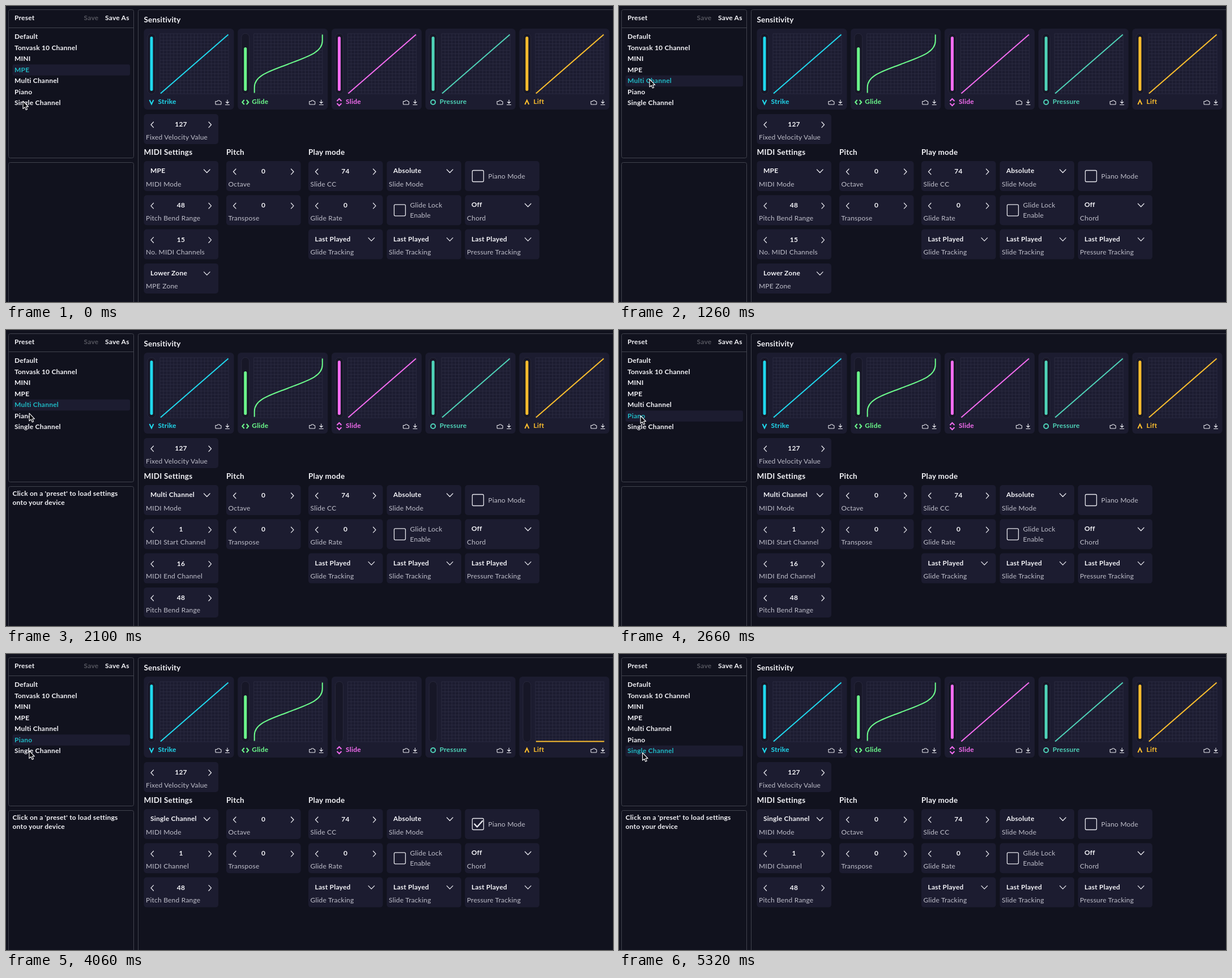
Recreate the animation shown at these times as an HTML page. Size 1072 px wide and 523 px high, loop 5740 ms.

```html
<!DOCTYPE html>
<html lang="en">
<head>
<meta charset="utf-8">
<title>Preset settings</title>
<style>
  html, body { margin: 0; width: 100%; height: 100%; overflow: hidden; background: #11121e; }
  svg { display: block; }
  text { font: 700 12px Lato, "Open Sans", sans-serif; letter-spacing: .22px; fill: #f4f4f8; white-space: pre; }
  .head { font-size: 13.5px; }
  .label { font-weight: 400; fill: #c0c0cb; }
  .value { text-anchor: middle; }
  .dim { fill: #55565f; }
  .active { fill: #1fb9c4; }
  .panel { fill: none; stroke: #41434e; }
  .tile { fill: #1c1c30; }
  .track { fill: #171727; stroke: #28283c; }
  .line { fill: none; stroke: #e8e8ee; stroke-width: 1.3; stroke-linecap: round; stroke-linejoin: round; }
  .thin { stroke-width: 1.1; }
  .check { stroke-width: 2.4; }
  .grid { fill: none; stroke: #2e2e45; stroke-width: .8; }
  .curve { fill: none; stroke-width: 2; }
</style>
</head>
<body>
<svg id="stage" width="1072" height="523" viewBox="0 0 1072 523"></svg>
<script>
const LOOP = 5740, TICK = 70;
const CLICK_MULTI = 1190, CLICK_PIANO = 2520, CLICK_SINGLE = 4550;
const MULTI_PART = 1680, MULTI_FULL = 1750, SINGLE_READY = 3010;

const text = (x, y, s, cls = '') => `<text x="${x}" y="${y}" class="${cls}">${s}</text>`;
const path = (d, cls = 'line', attrs = '') => `<path d="${d}" class="${cls}" ${attrs}/>`;
const rect = (x, y, w, h, r, cls, attrs = '') =>
  `<rect x="${x}" y="${y}" width="${w}" height="${h}" rx="${r}" class="${cls}" ${attrs}/>`;

// Markup shown only within the given [from, to) spans, in ms.
const during = (spans, markup) => `<g data-spans="${spans.join(' ')}">${markup}</g>`;

const COLS = [243.5, 389, 534, 672.5, 810.5];
const ROWS = [274, 334.3, 394.6, 454.9];
const tile = (x, y) => rect(x, y, 131.5, 53, 5, 'tile');
const caption = (x, y, s) => text(x + 3.5, y + 44.5, s, 'label');

function stepper(x, y, value, label) {
  return tile(x, y) + caption(x, y, label) + text(x + 65.5, y + 22, value, 'value') +
    path(`M${x + 17} ${y + 14}l-4.5 4.8l4.5 4.8M${x + 114.5} ${y + 14}l4.5 4.8l-4.5 4.8`);
}

function dropdown(x, y, value, label) {
  return tile(x, y) + caption(x, y, label) + text(x + 11.5, y + 21, value) +
    path(`M${x + 106} ${y + 15}l5.3 5.5l5.3-5.5`);
}

function checkbox(x, y, lines) {
  const top = lines.length > 1 ? 22 : 30.5;
  return tile(x, y) + rect(x + 13, y + 16.5, 20, 20, 2, 'line') +
    lines.map((s, i) => text(x + 41, y + top + i * 17.7, s, 'label')).join('');
}

const folderIcon = x => path(`M${x} 168.5v4.500q0 1 1 1h8q1 0 1-1v-3.500q0-1-1-1h-1l-1-1.500h-3l-1 1.500z`, 'line thin');
const downloadIcon = x => path(`M${x} 166v6m-2.5-2.5l2.5 2.5l2.5-2.5M${x - 3.5} 174.5h7`, 'line thin');

function sensor(i, name, color, icon) {
  const x = 243.5 + i * 165.75, gx = x + 28.5;
  let grid = '';
  for (let k = 0; k <= 20; k++) grid += `M${gx + k * 6.05} 49V155`;
  for (let k = 0; k <= 18; k++) grid += `M${gx} ${49 + k * 5.89}H${gx + 121}`;
  const stroke = `stroke="${color}"`;
  const bar = top => rect(x + 11, top, 5, 150 - top, 2.5, '', `fill="${color}"`);
  const ramp = bar(54) + path(`M${gx + 1} 154.5L${gx + 120.5} 50.5`, 'curve', stroke);
  const sCurve = bar(73) + path(`M${gx + 1} 153.5v-10c0-21 28-28.5 60-41s60-20 60-41v-11`, 'curve', stroke);
  const flat = path(`M${gx + 1} 154.5H${gx + 121.5}`, 'curve', stroke);
  const off = i === 4 ? 2800 : 2730, on = i === 4 ? 4760 : 4690;
  const graph = i === 0 ? ramp : i === 1 ? sCurve
    : during([0, off, on, LOOP], ramp) + (i === 4 ? during([off, on], flat) : '');
  return rect(x, 40, 159, 143, 6, 'tile') + rect(x + 6.5, 48.5, 14, 107, 7, 'track') +
    path(grid, 'grid') + graph +
    `<g transform="translate(${x + 13.5} 170)">${path(icon, 'curve', stroke)}</g>` +
    `<text x="${x + 25}" y="173.3" style="fill:${color}">${name}</text>` +
    folderIcon(x + 126.5) + downloadIcon(x + 147.5);
}

const presets = [
  ['Default'], ['Tonvask 10 Channel'], ['MINI'],
  ['MPE', 0, CLICK_MULTI],
  ['Multi Channel', CLICK_MULTI, CLICK_PIANO],
  ['Piano', CLICK_PIANO, CLICK_SINGLE],
  ['Single Channel', CLICK_SINGLE, LOOP]
];

function preset([name, from, to], i) {
  const y = 58 + i * 19.5;
  if (to === undefined) return text(15, y, name);
  return during([0, from, to, LOOP], text(15, y, name)) +
    during([from, to], rect(11.5, y - 13.2, 207.5, 19.5, 3, 'tile') + text(15, y, name, 'active'));
}

const [midi, pitch, play, slide, piano] = COLS;
const mode = name => dropdown(midi, ROWS[0], name, 'MIDI Mode');
const midiRow = (row, value, label) => stepper(midi, ROWS[row], value, label);

const leftSide =
  rect(4.5, 6.5, 221, 262, 3, 'panel') + path('M5 38.5H225', 'panel') +
  rect(4.5, 276.5, 221, 260, 3, 'panel') + rect(233.5, 6.5, 850, 530, 3, 'panel') +
  text(15, 25, 'Preset') + text(137.5, 25, 'Save', 'dim') + text(175, 25, 'Save As') +
  presets.map(preset).join('') +
  during([1540, CLICK_PIANO, 2870, CLICK_SINGLE, 4900, LOOP],
    text(11.5, 293, "Click on a 'preset' to load settings") + text(11.5, 309, 'onto your device'));

const sensors = [
  ['Strike', '#20d9ee', 'M-3.5-4L0 3.5L3.5-4'],
  ['Glide', '#6cfc8c', 'M-2-4l-3.5 4l3.5 4M2-4l3.5 4l-3.5 4'],
  ['Slide', '#f46cf0', 'M-4-2l4-4l4 4M-4 2l4 4l4-4'],
  ['Pressure', '#4fd3b8', 'M-4 0a4 4 0 1 0 8 0a4 4 0 1 0-8 0'],
  ['Lift', '#fbbe2e', 'M-3.5 4L0-3.5L3.5 4']
].map((s, i) => sensor(i, ...s)).join('');

const midiColumn =
  during([0, MULTI_PART], mode('MPE') + midiRow(1, 48, 'Pitch Bend Range') +
    midiRow(2, 15, 'No. MIDI Channels') + dropdown(midi, ROWS[3], 'Lower Zone', 'MPE Zone')) +
  during([MULTI_PART, SINGLE_READY], mode('Multi Channel')) +
  during([MULTI_PART, MULTI_FULL], midiRow(1, 48, 'Pitch Bend Range')) +
  during([MULTI_FULL, SINGLE_READY], midiRow(1, 1, 'MIDI Start Channel') +
    midiRow(2, 16, 'MIDI End Channel') + midiRow(3, 48, 'Pitch Bend Range')) +
  during([SINGLE_READY, LOOP], mode('Single Channel') +
    midiRow(1, 1, 'MIDI Channel') + midiRow(2, 48, 'Pitch Bend Range'));

const settings =
  text(243.5, 29, 'Sensitivity', 'head') + text(243.5, 263, 'MIDI Settings', 'head') +
  text(389, 263, 'Pitch', 'head') + text(534, 263, 'Play mode', 'head') +
  stepper(midi, 191, 127, 'Fixed Velocity Value') + midiColumn +
  stepper(pitch, ROWS[0], 0, 'Octave') + stepper(pitch, ROWS[1], 0, 'Transpose') +
  stepper(play, ROWS[0], 74, 'Slide CC') + stepper(play, ROWS[1], 0, 'Glide Rate') +
  dropdown(slide, ROWS[0], 'Absolute', 'Slide Mode') +
  checkbox(slide, ROWS[1], ['Glide Lock', 'Enable']) +
  checkbox(piano, ROWS[0], ['Piano Mode']) +
  during([2730, CLICK_SINGLE], path('M827.5 300.5l4.5 5l9.5-10.5', 'line check')) +
  dropdown(piano, ROWS[1], 'Off', 'Chord') +
  [[play, 'Glide'], [slide, 'Slide'], [piano, 'Pressure']]
    .map(([x, s]) => dropdown(x, ROWS[2], 'Last Played', s + ' Tracking')).join('');

const pointer = '<path id="pointer" d="M0 0V13.5L3.2 10.8L5.3 15.6L7.6 14.6L5.5 9.9H9.5Z" ' +
  'fill="#090910" stroke="#fff" stroke-width="1.1" stroke-linejoin="round"/>';

const stage = document.getElementById('stage');
stage.innerHTML = leftSide + sensors + settings + pointer;

const cursor = document.getElementById('pointer');
const timed = [...stage.querySelectorAll('[data-spans]')].map(node =>
  ({ node, spans: node.dataset.spans.split(' ').map(Number) }));

// Cursor stops: time, x, y.
const stops = [
  [0, 30, 168], [560, 55.5, 129.5], [1120, 55.5, 129.5], [1330, 53.5, 129.5],
  [1750, 53.5, 129.5], [2240, 38, 151.5], [3640, 38, 151.5], [4200, 41.5, 174.5], [LOOP, 41.5, 174.5]
];
const ease = p => p * p * (3 - 2 * p);

function draw(t) {
  for (const { node, spans } of timed) {
    const visible = spans.some((from, i) => i % 2 === 0 && t >= from && t < spans[i + 1]);
    node.style.display = visible ? '' : 'none';
  }
  const i = stops.findIndex(s => t < s[0]);
  const [t0, x0, y0] = stops[i - 1], [t1, x1, y1] = stops[i];
  const p = ease((t - t0) / (t1 - t0));
  cursor.setAttribute('transform', `translate(${x0 + (x1 - x0) * p} ${y0 + (y1 - y0) * p})`);
}

const start = performance.now();
function frame() {
  const t = (performance.now() - start) % LOOP;
  draw(Math.floor(t / TICK) * TICK);
  requestAnimationFrame(frame);
}
draw(0);
requestAnimationFrame(frame);
</script>
</body>
</html>
```
